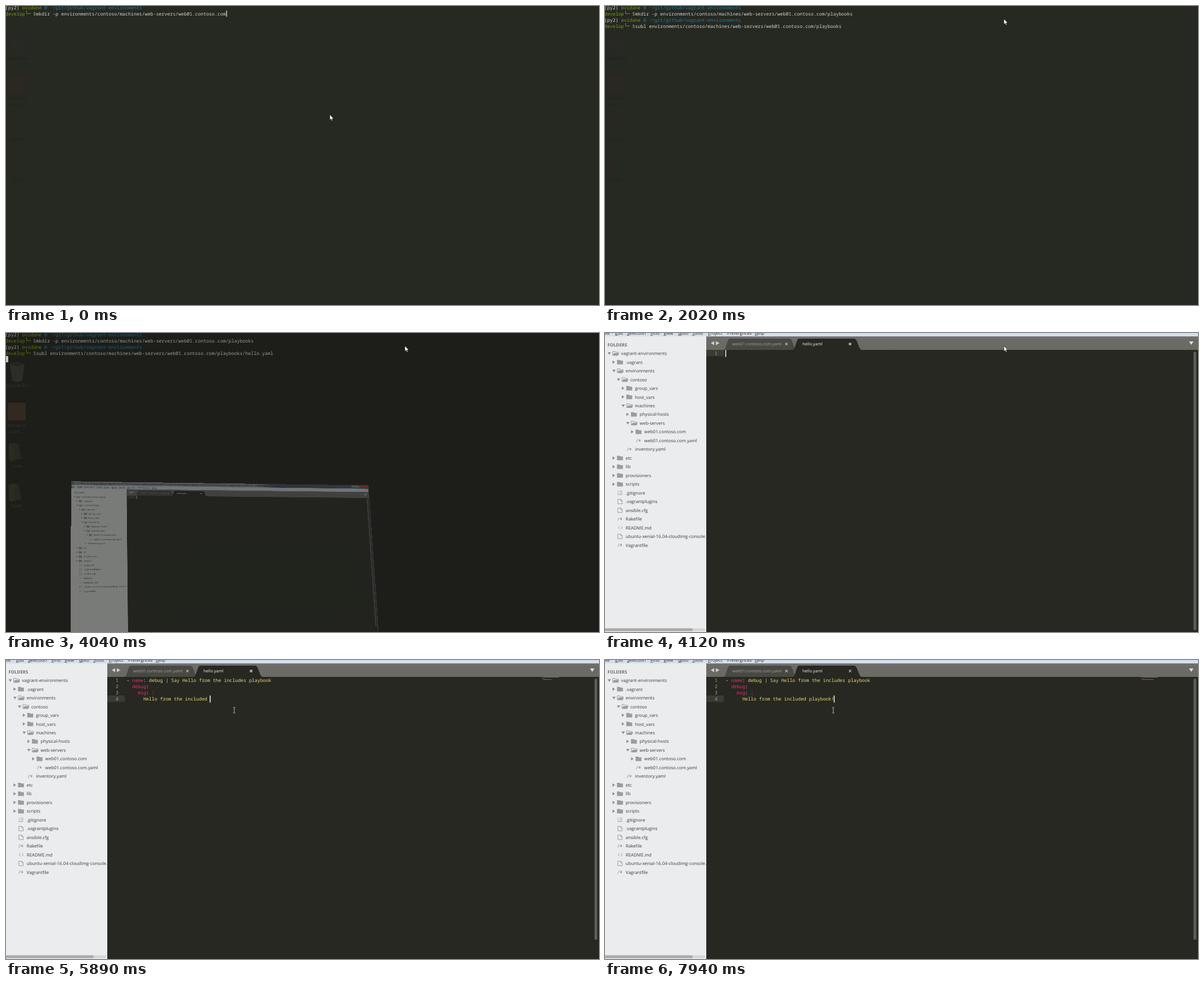
Write an HTML page that moves like this. It is 1054 px wide and 531 px high and loops after 8 s.

```html
<!DOCTYPE html>
<html lang="en">
<head>
<meta charset="utf-8">
<title>Adding a playbook</title>
<style>
html, body { margin: 0; width: 100%; height: 100%; overflow: hidden; background: #262822; }
main { position: absolute; inset: 0; overflow: clip; contain: strict; }
svg { position: absolute; left: 0; top: 0; width: 1054px; height: 531px; overflow: visible; transform-origin: 0 0; }
text { white-space: pre; text-rendering: geometricPrecision; font: 7.9px "Open Sans", "Noto Sans", sans-serif; }
.mono text { font: 8.28px "Noto Sans Mono", "DejaVu Sans Mono", monospace; }
#code text { font-size: 8.24px; }
.tab text { font-size: 7.4px; }
#desk { color: #20221c; }
#desk g { opacity: .35; }
.dim #desk { color: #33342e; }
.dim #desk g { opacity: 1; }
.dim .mono { opacity: .68; }
#desk text { text-anchor: middle; fill: currentColor; }
.u { text-decoration: underline; }
</style>
</head>
<body>
<main>
<svg id="term"></svg>
<svg id="win"></svg>
<svg id="mouse">
  <path id="arrow" d="M0 0V9.6L2.2 7.6L3.7 11L5.3 10.3L3.8 7H6.8Z" fill="#fff" stroke="#111" stroke-width=".6"/>
  <path id="beam" d="M-2 -4.7H-.6L0 -4.2L.6 -4.7H2M0 -4.2V4.7M-2 5.2H-.6L0 4.7L.6 5.2H2" fill="none" stroke="#c9c9c5" stroke-width=".9"/>
</svg>
</main>
<script>
const $ = id => document.getElementById(id);
const rect = (x, y, w, h, fill, more = '') => `<rect x="${x}" y="${y}" width="${w}" height="${h}" fill="${fill}" ${more}/>`;
const path = (d, fill, more = '') => `<path d="${d}" fill="${fill}" ${more}/>`;
const text = (x, y, s, fill, more = '') => `<text x="${x}" y="${y}" fill="${fill}" ${more}>${s}</text>`;
const span = (s, fill) => `<tspan fill="${fill}">${s}</tspan>`;
const show = (el, on) => el.setAttribute('visibility', on ? 'inherit' : 'hidden');

// ---- terminal ----
const TERM_X = -1.2, TERM_W = 4.968;
const WHITE = '#d2d3cc', GREEN = '#74a010', BLUE = '#1f7c9f';
const DIR = 'environments/contoso/machines/web-servers/web01.contoso.com';

const prompt = (y, id) =>
  text(TERM_X, y, '(py2) ' + span('ovidane ', GREEN) + span('@ ~/git/github/vagrant-environments', BLUE), WHITE) +
  text(TERM_X, y + 11, span('develop', GREEN) + '   ' + span('$', '#a9a45a') + `<tspan id="${id}"></tspan>`, WHITE) +
  path(`M36.5 ${y + 2.5}V${y + 8}H44`, 'none', `stroke="${GREEN}" stroke-width=".9"`);

const folderIcon = y => path(`M5 ${y + 2}L15 ${y}V${y + 29}L12 ${y + 33}L5 ${y + 30}Z`, '#2c2a21') +
  path(`M15 ${y}L23 ${y + 3}L27 ${y + 28}L15 ${y + 31}Z`, '#282820');

$('term').innerHTML = `
  <rect id="back" width="1054" height="531"/>
  <g id="desk">
    <g>${path('M7 55L19 52L33 55L29 85L20 87L11 85Z', '#2c2d28')}${path('M9 56L19 54L31 56L20 59Z', '#22231e')}
    ${rect(3, 124, 32, 31, '#322a20', 'rx="2"')}${folderIcon(195)}${folderIcon(267)}</g>
    ${[[96, 'Recycle Bin'], [167, 'Melodrift'], [178, 'Suite ...'], [239, 'icons'], [310, 'Tools']]
      .map(([y, s]) => `<text x="19" y="${y}">${s}</text>`).join('')}
  </g>
  <g class="mono">${prompt(5.6, 'cmd1')}<g id="second">${prompt(27.6, 'cmd2')}</g></g>
  ${rect(0, 8, 1.2, 11, '#f2f2ec', 'id="termCaret"')}
  ${rect(0, 41, 4, 11, '#c8c9c3', 'id="block"')}`;

// ---- editor ----
const CODE_X = 214.5, CODE_W = 4.944, BG = '#272822';
const GRAY = '#9b9c9d', LIGHT = '#f8f8f2', KEY = '#f92672', STR = '#e6db74';

// depth, kind (o: open, c: closed, other: file icon), label
const TREE = `0 o vagrant-environments
1 c .vagrant
1 o environments
2 o contoso
3 c group_vars
3 c host_vars
3 o machines
4 c physical-hosts
4 o web-servers
5 c web01.contoso.com
5 / web01.contoso.com.yaml
3 / inventory.yaml
1 c etc
1 c lib
1 c provisioners
1 c scripts
1 = .gitignore
1 f .vagrantplugins
1 f ansible.cfg
1 / Rakefile
1 < README.md
1 f ubuntu-xenial-16.04-cloudimg-console.log
1 / Vagrantfile`.split('\n').map(s => s.split(' '));

const line = `stroke="${GRAY}" stroke-width="1"`;
const ICONS = {
  o: path('M-20.5 -2H-24L-21 2.5L-18 -2Z', '#8d8e8f') +
     path('M-15 3.5V-3.5H-10.5L-9.5 -2.2H-5V-.5', 'none', line) + path('M-15 4L-12.8 -.6H-3.3L-5.5 4Z', GRAY),
  c: path('M-23.5 -3V3L-19 0Z', '#8d8e8f') + path('M-15.5 4V-4H-11L-9.8 -2.8H-5V4Z', GRAY),
  '/': path('M-14 3L-11.6 -3M-8.3 -2.5V2M-10.2 -1.3L-6.4 .8M-10.2 .8L-6.4 -1.3', 'none', line),
  '<': path('M-11 -2.5L-13.5 0L-11 2.5M-8.5 -2.5L-6 0L-8.5 2.5', 'none', line),
  '=': path('M-14.5 -3H-12.5M-11 -3H-6M-14.5 0H-12.5M-11 0H-6M-14.5 3H-6', 'none', line),
  f: path('M-14 -4H-9L-6.3 -1.5V4H-14ZM-9 -4V-1.5H-6.3', 'none', line)
};
const tree = TREE.map(([depth, kind, label], i) =>
  `<g transform="translate(${28.6 + 8.25 * depth} ${36.2 + 15.48 * i})">${ICONS[kind]}${text(0, 2.9, label, '#3b3c3e')}</g>`).join('');

const MENU = [[-4, 'File'], [18, 'Edit'], [39, 'Selection'], [81, 'Find'], [104, 'View'], [130, 'Goto'],
  [155, 'Tools'], [183, 'Project'], [217, 'Preferences', 6], [266, 'Help']];
const menu = MENU.map(([x, s, k = 0]) =>
  text(x, 2.6, s.slice(0, k) + `<tspan class="u">${s[k]}</tspan>` + s.slice(k + 1), '#26272b')).join('');

const CODE = [
  [['- ', LIGHT], ['name', KEY], [': ', LIGHT], ['debug | Say Hello from the includes playbook', STR]],
  [['  debug', KEY], [':', LIGHT]],
  [['    msg', KEY], [': ', LIGHT], ['|', '#a3274f']]
];
const LAST = 'Hello from the included playbook!';
const LENGTHS = CODE.map(row => row.reduce((n, [s]) => n + s.length, 0));
const mini = (i, from, to, fill, more = '') =>
  rect(951 + .615 * from, 30 + 1.4 * i, .615 * (to - from), .9, fill, 'opacity=".45" ' + more);
const codeRow = (row, i) => `<g class="row">
  ${text(CODE_X, 38.5 + 11 * i, row.map(p => span(p[0], p[1])).join(''), LIGHT)}
  ${i ? mini(i, 2 * i, LENGTHS[i], KEY) : mini(0, 0, 7, KEY) + mini(0, 8, 52, STR)}</g>`;

const cross = x => path(`M${x - 2} 17.5l4 4m0 -4l-4 4`, 'none', 'stroke="#b9bab3" stroke-width="1.1"');
const TITLE = 'C:\\Users\\ovidane\\git\\github\\vagrant-environments\\' + DIR.replaceAll('/', '\\') +
  '\\playbooks\\hello.yaml • (vagrant-environments) - Quillow Text';

$('win').innerHTML = `
  <defs>
    <linearGradient id="glass"><stop offset="0" stop-color="#8f959b"/><stop offset=".6" stop-color="#8b929a"/>
      <stop offset=".66" stop-color="#3d4a58"/><stop offset="1" stop-color="#4a5866"/></linearGradient>
    <linearGradient id="bar" x2="0" y2="1"><stop offset="0" stop-color="#74756f"/><stop offset=".2" stop-color="#6b6c66"/>
      <stop offset="1" stop-color="#696a64"/></linearGradient>
    <clipPath id="side"><rect y="6" width="180" height="550"/></clipPath>
  </defs>
  ${rect(-4, -21, 1061, 577, 'url(#glass)')}
  ${rect(-4, -20, 10, 10, '#6f6a62')}${text(12, -11, TITLE, '#15181c')}
  ${rect(990, -20, 30, 9, '#7f8993')}${rect(1021, -20, 34, 9, '#c0392f')}
  ${rect(0, -7, 1054, 13, '#d5deee')}${menu}
  ${rect(-4, 6, 184, 545, '#ebeced')}
  ${text(4.5, 24, 'FOLDERS', '#6f7072', 'style="font-weight:700"')}
  <g clip-path="url(#side)">${tree}</g>
  ${rect(0, 524.5, 178, 5, '#d4d5d6', 'rx="2.5"')}${rect(-4, 524.5, 160, 5, '#a9aaab', 'rx="2.5"')}
  ${rect(180, 6, 874, 545, BG)}${rect(180, 6, 874, 24, 'url(#bar)')}
  ${rect(0, 551, 1054, 5, '#b8babb')}
  ${path('M194 14.5V21.5L188 18ZM197 14.5V21.5L203.5 18Z', '#d0d1cc')}
  ${path('M1038 15H1046L1042 21Z', '#dededa')}
  <g class="tab">
    ${path('M211 30C216 28 217 10 222 10H328C334 10 335 28 340 30Z', '#484942')}
    ${text(226, 22.3, 'web01.contoso.com.yaml', '#9fa099')}${cross(322.5)}
    ${path('M334 30C339 28 340 10 345 10H443C449 10 450 28 456 30Z', BG)}
    ${text(351, 22.3, 'hello.yaml', '#f4f4ee')}
    <circle id="dirty" cx="435.6" cy="19.5" r="2.5" fill="#a2a39c"/><g id="saved">${cross(435.6)}</g>
  </g>
  ${rect(180, 30, 31, 11.4, '#3a3b32', 'id="gutter"')}
  <rect id="scroll" x="1046" y="33" width="5" rx="2.5" fill="#5b5c56"/>
  <g id="code" class="mono">
    ${[1, 2, 3, 4].map(n => text(195, 27.5 + 11 * n, n, '#a0a19a', 'class="num"')).join('')}
    ${CODE.map(codeRow).join('')}
    ${text(CODE_X + 6 * CODE_W, 71.5, '', STR, 'id="last"')}
    ${mini(3, 6, 7, STR, 'id="lastMini"')}
  </g>
  ${rect(0, 30, 1.5, 12.5, LIGHT, 'id="caret"')}`;

const rows = document.querySelectorAll('.row'), nums = document.querySelectorAll('.num');

// ---- time ----
// number of evenly spaced steps taken by time t
const steps = (t, from, to, n) =>
  t < from ? 0 : Math.min(n, 1 + Math.floor((t - from) / (to - from) * (n - 1) + 1e-6));

const TILT = 'matrix3d(.553,.02993,0,.0000854,-.0095,.46205,0,-.0000664,0,0,1,0,118,263.3,0,1) translateY(21px)';

function drawTerminal(t) {
  const first = `mkdir -p ${DIR}` + '/playbooks'.slice(0, steps(t, 270, 1270, 7) + steps(t, 1400, 1630, 3));
  const typed = steps(t, 2330, 2870, 4) + Math.round(steps(t, 3420, 3650, 3) * 7 / 3);
  const second = `subl ${DIR}/playbooks` + '/hello.yaml'.slice(0, typed);
  const entered = t >= 2020, dim = t >= 3960;
  $('cmd1').textContent = first;
  $('cmd2').textContent = second;
  show($('second'), entered);
  show($('block'), t >= 3740);
  show($('termCaret'), !entered || (t >= 2330 && t < 3650));
  $('termCaret').setAttribute('x', TERM_X + TERM_W * (11 + (entered ? second : first).length) + .2);
  $('termCaret').setAttribute('y', entered ? 30 : 8);
  $('term').setAttribute('class', dim ? 'dim' : '');
  $('back').setAttribute('fill', dim ? '#1d1e1a' : '#262822');
}

function drawEditor(t) {
  const opening = t < 4120;
  show($('win'), t >= 4040);
  $('win').style.transform = opening ? TILT : 'none';
  $('win').style.opacity = opening ? .45 : 1;

  const pasted = steps(t, 4490, 5360, 11);
  const lines = Math.max(1, Math.min(4, pasted));
  const typed = Math.round(Math.max(0, pasted - 3) * 14 / 8) +
    Math.round(steps(t, 5750, 5890, 3) * 10 / 3) +
    steps(t, 6260, 6570, 4) + steps(t, 6860, 7470, 5);
  const col = lines > 3 ? 6 + typed : pasted ? LENGTHS[lines - 1] : 0;

  rows.forEach((row, i) => show(row, i < pasted));
  nums.forEach((num, i) => show(num, i < lines));
  $('last').textContent = LAST.slice(0, typed);
  $('lastMini').setAttribute('width', .615 * typed);
  $('gutter').setAttribute('y', 19 + 11 * lines);
  $('scroll').setAttribute('height', 495 * 495 / (495 + 11 * (lines - 1)));
  $('caret').setAttribute('x', CODE_X + CODE_W * col - .7);
  $('caret').setAttribute('y', 19 + 11 * lines);
  show($('caret'), t < 7860 || t >= 7940);
  show($('dirty'), t < 7940);
  show($('saved'), t >= 7940);
}

function drawMouse(t) {
  const p = steps(t, 4490, 4755, 4) / 4;
  const beam = t >= 4490 || (t >= 3420 && t < 3740);
  const [x, y] = t < 2020 ? [575.6, 193] : [709 - 303.3 * p, 23 + 66 * p];
  show($('arrow'), !beam);
  show($('beam'), beam);
  $('mouse').style.transform = `translate(${x}px, ${y}px)`;
}

function frame() {
  const t = performance.now() % 8000;
  drawTerminal(t);
  drawEditor(t);
  drawMouse(t);
  requestAnimationFrame(frame);
}
frame();
</script>
</body>
</html>
```
